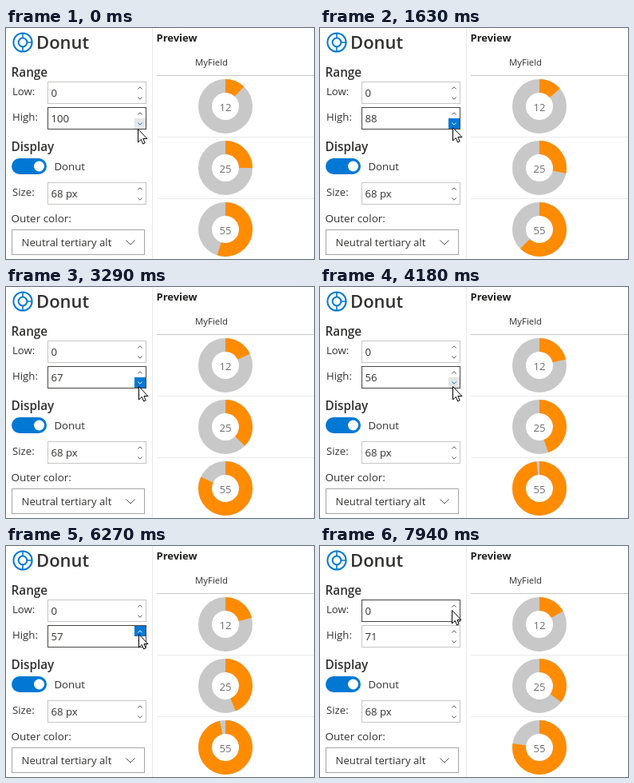
These frames come from a looping animation (386x289 px, 7990 ms). An HTML page:

```html
<!DOCTYPE html>
<html lang="en">
<head>
<meta charset="utf-8">
<title>Donut settings</title>
<style>
  html, body { margin: 0; width: 100%; height: 100%; overflow: hidden; background: #fff; }
  svg { display: block; }
  text { font: 13.2px "Open Sans", "Noto Sans", sans-serif; fill: #323130; }
  .title { font-size: 22px; font-weight: 600; }
  .head { font-size: 15.3px; font-weight: 600; }
  .bold { font-size: 13px; font-weight: 700; fill: #201f1e; }
  .small { font-size: 11.4px; }
  .num { fill: #6e6e6e; text-anchor: middle; }
  .line { fill: none; stroke: #505050; }
  .box { fill: none; stroke: #c8c6c4; }
  .box.active { stroke: #484644; }
  .ring { fill: none; stroke: #c8c8c8; stroke-width: 17; }
  .slice { stroke: #ff8c00; }
  .hover rect { fill: #e6e6e6; }
  .hover path { stroke: #0078d4; }
  .press rect { fill: #0078d4; }
  .press path { stroke: #fff; }
</style>
</head>
<body>
<svg width="386" height="289" viewBox="0 0 386 289">
  <g fill="none" stroke="#0078d4" stroke-width="2">
    <circle cx="21" cy="18" r="11.6"/>
    <circle cx="21" cy="18" r="5.4"/>
    <path d="M21 6.5V12.5M26.5 18H32.5M21 23.5V29.5" stroke-width="1.6"/>
  </g>
  <text class="title" x="38" y="26">Donut</text>
  <text class="head" x="6.5" y="61">Range</text>
  <text x="8" y="84">Low:</text>
  <text x="8" y="116">High:</text>
  <text class="head" x="6.5" y="154">Display</text>
  <rect x="7" y="163" width="44" height="20" rx="10" fill="#0078d4"/>
  <circle cx="41.5" cy="173" r="6.5" fill="#fff"/>
  <text x="60.5" y="178">Donut</text>
  <text x="8" y="210">Size:</text>
  <text x="6.5" y="243" style="font-size:13.5px">Outer color:</text>
  <g id="fields"></g>
  <rect x="7.5" y="252.5" width="166" height="31" fill="none" stroke="#a6a6a6"/>
  <text x="19.5" y="273">Neutral tertiary alt</text>
  <path class="line" d="M150.5 265.5l5.5 5.5 5.5-5.5"/>

  <path d="M183.5 0V289M189 136.5H386M189 213.5H386" stroke="#eaeaea"/>
  <path d="M189 59.5H386" stroke="#c8c8c8"/>
  <text class="bold" x="188.5" y="17">Preview</text>
  <text class="small" x="237" y="47">MyField</text>
  <g id="donuts"></g>

  <path id="cursor" d="M0 0V16.5L3.8 12.9 6.2 18.5 8.7 17.4 6.4 12H11.4Z" fill="#fff" stroke="#000"/>
</svg>
<script>
const $ = id => document.getElementById(id);

const button = (id, y, caret) =>
  `<g id="${id}"><rect x="161" y="${y}" width="14" height="13" fill="none"/>
   <path class="line" d="M165.3 ${y + caret[0]}l2.7 ${caret[1]} 2.7 ${-caret[1]}"/></g>`;
const field = (name, y, value) =>
  button(name + 'Up', y + 1, [8.5, -2.7]) + button(name + 'Down', y + 14, [5.5, 2.7]) +
  `<rect id="${name}" class="box" x="52.5" y="${y + .5}" width="123" height="27"/>
   <text id="${name}Text" x="56.5" y="${y + 19}">${value}</text>`;
$('fields').innerHTML =
  field('low', 67, 0) + field('high', 99, 100) + field('size', 193, '68 px');

const values = [12, 25, 55];
$('donuts').innerHTML = values.map((v, i) => {
  const y = 98 + 77 * i;
  const ring = `cx="275" cy="${y}" r="25.5"`;
  return `<circle class="ring" ${ring}/>
    <circle class="ring slice" ${ring} pathLength="100" transform="rotate(-90 275 ${y})"/>
    <text class="num" x="275" y="${y + 6}">${v}</text>`;
}).join('');
const slices = document.querySelectorAll('.slice');

const LOOP = 7990;

// Spinner runs: start, end, first value, last value
const runs = [
  [0, 0, 100, 100], [500, 500, 99, 99], [860, 1100, 98, 95], [1240, 2010, 93, 83],
  [2100, 2890, 82, 72], [2970, 3680, 71, 62], [3780, 4180, 61, 56],
  [5200, 5200, 55, 55], [5860, 5860, 56, 56], [6270, 7000, 57, 66], [7080, 7400, 67, 71]
];

// Pointer poses: time, x, y, button, button state
const poses = [
  [0, 165.5, 126.5, 'Down', 'hover'], [90, 166, 126.5, 'Down', 'hover'],
  [170, 166, 125.5, 'Down', 'hover'], [290, 166.5, 124.5, 'Down', 'hover'],
  [500, 166.5, 124.5, 'Down', 'press'], [4180, 166.5, 124.5, 'Down', 'hover'],
  [4790, 166.5, 121.5, 'Down', 'hover'], [4840, 166.5, 116.5, 'Down', 'hover'],
  [4890, 166.5, 113, 'Down', 'hover'], [5200, 166.5, 113, 'Down', 'press'],
  [5380, 166.5, 113, 'Down', 'hover'], [5710, 166.5, 110.5, 'Up', 'hover'],
  [5860, 166.5, 110.5, 'Up', 'press'], [7540, 166.5, 110.5, 'Up', 'hover'],
  [7600, 166.5, 104.5, 'Up', 'hover'], [7650, 166, 97.5], [7710, 165.5, 91.5],
  [7940, 165.5, 80.5]
];

const current = (list, t) => list.findLast(item => item[0] <= t);

function highAt(t) {
  const [start, end, from, to] = current(runs, t);
  const n = Math.abs(to - from);
  if (!n) return from;
  const k = Math.min(n, Math.floor((t - start) / (end - start) * n + .1));
  return from + k * Math.sign(to - from);
}

function draw(t) {
  const high = highAt(t);
  $('highText').textContent = high;
  slices.forEach((s, i) =>
    s.setAttribute('stroke-dasharray', `${100 * values[i] / high} 100`));

  const [, x, y, name, state] = current(poses, t);
  $('cursor').setAttribute('transform', `translate(${x} ${y})`);
  for (const b of ['Up', 'Down'])
    $('high' + b).setAttribute('class', b === name ? state : '');
  const onLow = y < 95;
  $('low').classList.toggle('active', onLow);
  $('high').classList.toggle('active', !onLow);
}

const begin = performance.now();
function tick() {
  draw((performance.now() - begin) % LOOP);
  requestAnimationFrame(tick);
}
tick();
</script>
</body>
</html>
```
